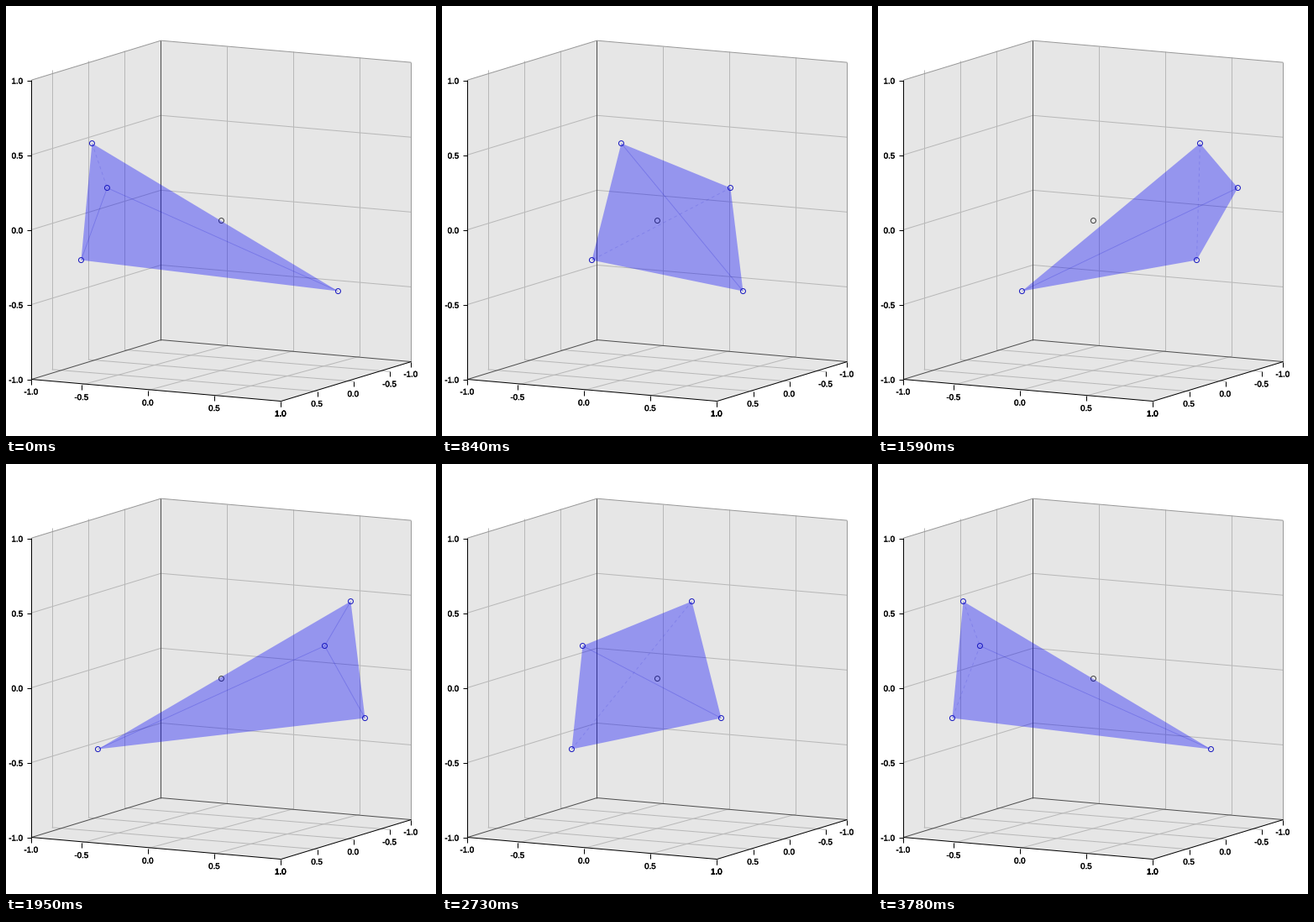
These frames come from a looping animation (512x512 px, 3810 ms). A matplotlib script:

```python
from itertools import combinations

import matplotlib.pyplot as plt
import numpy as np
from matplotlib import patheffects
from matplotlib.animation import FuncAnimation
from matplotlib.collections import LineCollection
from matplotlib.patches import Circle, Polygon

SIZE, FRAMES, INTERVAL = 512, 127, 30
STEP = 0.05          # radians turned per frame
PX = 0.72            # one pixel in points at 100 dpi
XMIN, XMAX = 30, 482

# Projected half-unit steps of the three axes, from the back lower corner.
CORNER = np.array([184, 397])
U = np.array([79, 6.5])
V = np.array([-43.25, 11.75])
W = np.array([0, -89.1])

# Tetrahedron corners: screen x is CX + a cos(t) + b sin(t), height is fixed.
CX = 256
A = np.array([-154, -136, -167, 139])
B = np.array([-17, 112.2, -50, 80])
HEIGHTS = np.array([163, 216, 302, 339])

fig = plt.figure(figsize=(5.12, 5.12), dpi=100, facecolor="white")
ax = fig.add_axes([0, 0, 1, 1])
# Whole numbers are pixel centres, nudged so that line snapping keeps them.
ax.set_xlim(-0.45, SIZE - 0.45)
ax.set_ylim(SIZE - 0.55, -0.55)
ax.axis("off")


def point(u, v, w):
    """Project a box position; x is held inside the plot area."""
    x, y = CORNER + u * U + v * V + w * W
    return min(max(x, XMIN), XMAX), y


def line(p, q, color, z=2):
    ax.plot(*zip(p, q), color=color, lw=PX, zorder=z, solid_capstyle="butt")


def label(x, y, value, ha="center"):
    text = ax.text(x, y, f"{value:.1f}", ha=ha, va="center_baseline",
                   family="Liberation Sans", size=9.7 * PX,
                   color="black", zorder=9)
    text.set_path_effects(
        [patheffects.withStroke(linewidth=0.35 * PX, foreground="black")])


def draw_box():
    o, left, right, front = (point(0, 0, 0), point(0, 4, 0),
                             point(4, 0, 0), point(4, 4, 0))
    o_top, left_top, right_top = (point(0, 0, 4), point(0, 4, 4),
                                  point(4, 0, 4))
    for wall in ([o, left, left_top, o_top], [o, right, right_top, o_top],
                 [o, left, front, right]):
        ax.add_patch(Polygon(wall, fc="#e6e6e6", ec="none", zorder=0))

    grid = "#b8b8b8"
    for i in (1, 2, 3):
        line(point(i, 0, 0), point(i, 0, 4), grid, 1)
        line(point(i, 0, 0), point(i, 4, 0), grid, 1)
        line(point(0, i, 0), point(0, i, 4), grid, 1)
        line(point(0, i, 0), point(4, i, 0), grid, 1)
        line(point(0, 0, i), point(4, 0, i), grid, 1)
        line(point(0, 0, i), point(0, 4, i), grid, 1)

    for p, q in ((left_top, o_top), (o_top, right_top), (right_top, right)):
        line(p, q, "#999999")
    for p, q in ((o_top, o), (o, left), (o, right)):
        line(p, q, "#4d4d4d")
    for p, q in ((left_top, left), (left, front), (front, right)):
        line(p, q, "black", 3)


def draw_ticks():
    for i in range(5):
        value = -1 + i / 2
        x, y = point(0, 4, i)
        y = round(y)
        line((x - 5, y), (x, y), "black", 3)
        label(19.5, y, value, ha="right")
        for x, y in (point(i, 4, 0), point(4, i, 0)):
            line((x, y), (x, y + 6), "black", 3)
            label(x - 0.7, y + 14, value)


def ring(x, y, color, z):
    return ax.add_patch(Circle((x, y), 3, fc="none", ec=color, lw=PX,
                               zorder=z))


draw_box()
draw_ticks()
ring(256, 255, "#404040", 4)

body = ax.add_patch(Polygon(np.zeros((3, 2)), fc=(0, 0, 1, 0.35), ec="none",
                            zorder=5))


def seams(alpha, dash="solid"):
    return ax.add_collection(LineCollection(
        [], colors=[(0, 0, 0.8, alpha)], linewidths=0.9 * PX,
        linestyles=[dash], zorder=6))


solid = seams(0.2)
dashed = seams(0.13, (0, (4, 4)))
rings = [ring(0, y, "#1818c0", 7) for y in HEIGHTS]


def is_outline(pts, i, j):
    """True if the other two corners lie on one side of edge i-j."""
    dx, dy = pts[j] - pts[i]
    sides = [dx * (p[1] - pts[i][1]) - dy * (p[0] - pts[i][0])
             for k, p in enumerate(pts) if k not in (i, j)]
    return sides[0] * sides[1] > 0


def is_solid(pts, depth, i, j):
    dx, dy = pts[j] - pts[i]
    if dx > abs(dy):
        return True
    near = (depth[i] + depth[j]) / 2 < depth.mean()
    return near and abs(dy) < 4 * abs(dx)


def update(n):
    c, s = np.cos(n * STEP), np.sin(n * STEP)
    pts = np.column_stack([np.floor(CX + A * c + B * s), HEIGHTS])
    depth = B * c - A * s

    hull, lines, dashes = set(), [], []
    for i, j in combinations(range(4), 2):
        if is_outline(pts, i, j):
            hull |= {i, j}
        else:
            group = lines if is_solid(pts, depth, i, j) else dashes
            group.append(pts[[i, j]])

    corners = pts[sorted(hull)]
    dx, dy = (corners - corners.mean(axis=0)).T
    body.set_xy(corners[np.argsort(np.arctan2(dy, dx))])
    solid.set_segments(lines)
    dashed.set_segments(dashes)
    for r, p in zip(rings, pts):
        r.center = tuple(p)
    return [body, solid, dashed, *rings]


anim = FuncAnimation(fig, update, frames=FRAMES, interval=INTERVAL,
                     repeat=True, repeat_delay=0, blit=False)
plt.show()
```
